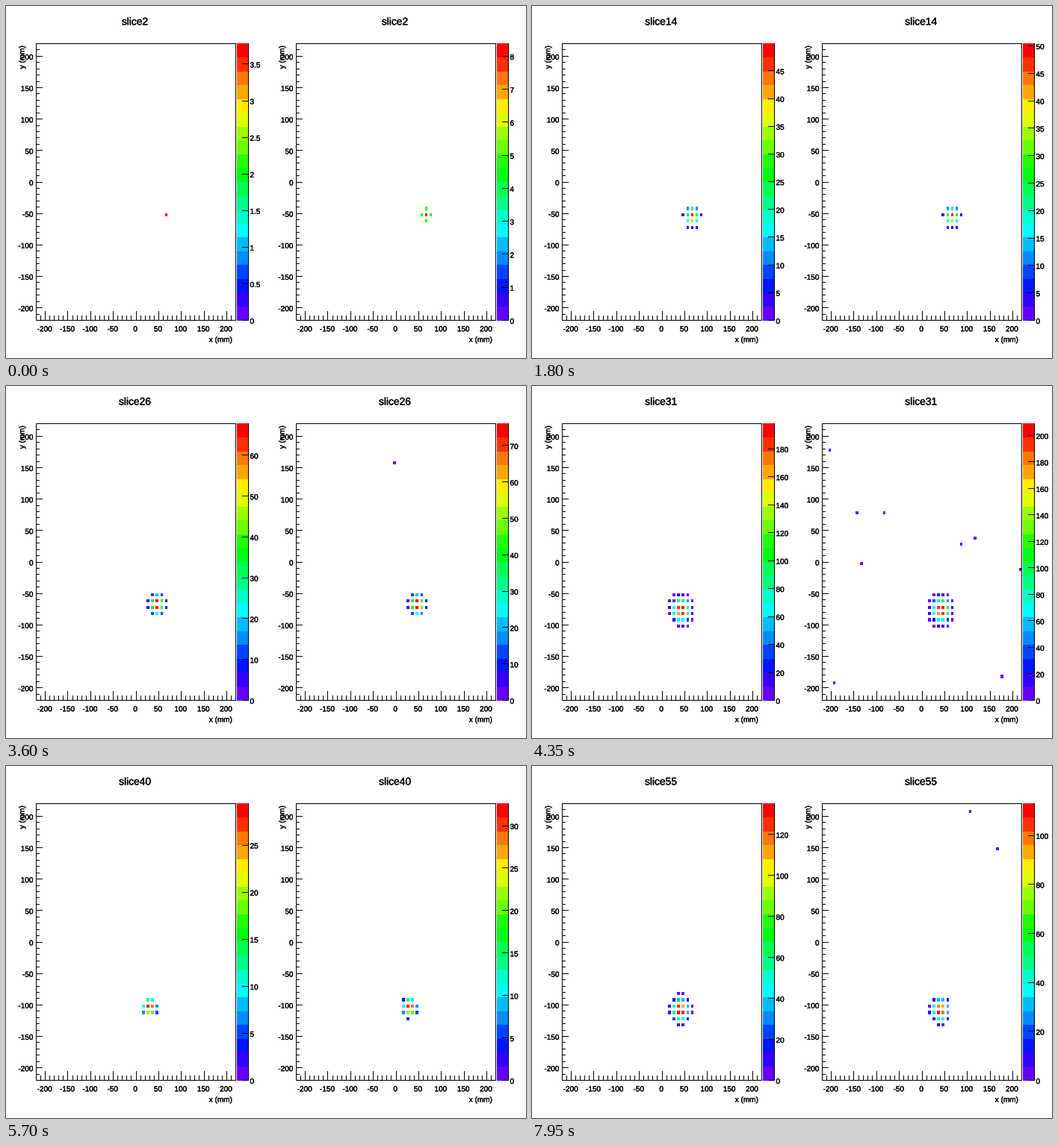
These frames come from a looping animation (696x472 px, 8000 ms). A matplotlib script:

```python
import colorsys
import math

import matplotlib.pyplot as plt
import numpy as np
from matplotlib.animation import FuncAnimation
from matplotlib.collections import LineCollection, PatchCollection
from matplotlib.patches import Rectangle
from matplotlib.patheffects import withStroke

W, H, DPI = 696, 472, 100
INTERVAL, LOOP, STEP = 50, 8000, 150
FIRST_SLICE = 2
PX = 72 / DPI
LEFT, RIGHT, TOP, BOTTOM = 40.5, 307.5, 50.5, 421.5
SCALE_X, SCALE_Y = (RIGHT - LEFT) / 440, (BOTTOM - TOP) / 440
OFFSETS = (0, 348)
LEVELS = 20
COLORS = [colorsys.hsv_to_rgb((280 - 5.6 * (int((i + 0.99) * 2.5) + 1)) / 360, 1, 1)
          for i in range(LEVELS)]
CUTOFF = 3.5

# Spot path along the slices: slice, x, y, left peak, right peak
PATH = np.array([
    (2, 67, -52, 3.78, 8.38),
    (14, 67, -54, 49.9, 50.4),
    (20, 53, -57, 18.7, 22.6),
    (31, 43, -76, 198, 209),
    (40, 31, -104, 29.4, 32.6),
    (47, 35, -110, 34.9, 24.5),
    (55, 41, -108, 135, 113),
])
XS = np.arange(-213, 220, 10)
YS = np.arange(-212, 220, 10)

fig = plt.figure(figsize=(W / DPI, H / DPI), dpi=DPI, facecolor="white")
ax = fig.add_axes((0, 0, 1, 1))
ax.set(xlim=(0, W), ylim=(H, 0))
ax.axis("off")


def label(x, y, text, size=10, **kw):
    kw = {"ha": "center", "va": "center_baseline", **kw}
    return ax.text(x, y, text, fontsize=size * PX, family="Liberation Sans",
                   path_effects=[withStroke(linewidth=0.35 * PX, foreground="black")], **kw)


def lines(segments):
    """Draw black lines one pixel wide, centred on whole pixels."""
    centred = [np.floor(segment) + 0.5 for segment in segments]
    return ax.add_collection(LineCollection(centred, colors="black", linewidths=PX,
                                            antialiaseds=False, snap=False,
                                            capstyle="projecting", zorder=3))


def boxes(rects, colors):
    patches = [Rectangle((x0, y0), x1 - x0, y1 - y0) for x0, y0, x1, y1 in rects]
    return ax.add_collection(PatchCollection(patches, facecolors=colors, edgecolors="none",
                                             linewidths=0, antialiaseds=False,
                                             snap=False, zorder=2))


def to_px(x, y):
    return LEFT + (x + 220) * SCALE_X, (TOP + BOTTOM) / 2 - y * SCALE_Y


def draw_panel(dx):
    left, right = LEFT + dx, RIGHT + dx
    segments = [[(left, TOP), (right, TOP), (right, BOTTOM), (left, BOTTOM), (left, TOP)],
                [(dx + 324, TOP), (dx + 324, BOTTOM)]]
    for value in range(-220, 221, 10):
        x, y = to_px(value, value)
        x += dx
        major = value % 50 == 0
        segments.append([(x, BOTTOM), (x, BOTTOM - (12 if major else 6))])
        segments.append([(left, y), (left + (8 if major else 4), y)])
        if major:
            label(x - 0.8, 432.3, str(value))
            label(dx + 36.6, y + 0.5, str(value), ha="right")
    lines(segments)
    label(dx + 303, 446.5, "x (mm)", ha="right")
    label(dx + 21.5, 53, "y (mm)", rotation=90, va="top")
    edges = np.round(np.linspace(BOTTOM, TOP, LEVELS + 1))
    boxes([(dx + 309, b, dx + 325, a) for a, b in zip(edges, edges[1:])], COLORS)


def tick_step(peak):
    base = 10 ** math.floor(math.log10(peak / 10))
    ratio = peak / 10 / base
    return base * next(m for limit, m in ((1, 1), (2.5, 2), (5.2, 5), (10, 10))
                       if ratio <= limit)


def along_path(number, column):
    return np.interp(number, PATH[:, 0], column)


def cells_at(panel, number):
    """Return the peak count and the colour level of every lit cell."""
    cx, cy = along_path(number, PATH[:, 1]), along_path(number, PATH[:, 2])
    peak = math.exp(along_path(number, np.log(PATH[:, 3 + panel])))
    sigma = 8.6 + peak / 100
    gx, gy = np.meshgrid(XS, YS)
    counts = peak * np.exp(-((gx - cx) ** 2 + (gy - cy) ** 2) / (2 * sigma ** 2))
    lit = counts >= min(CUTOFF, counts.max())
    if panel == 1:
        # The right panel has background hits that grow with brightness.
        rng = np.random.default_rng(number)
        strays = int((peak / 66) ** 2)
        lit[rng.integers(len(YS), size=strays), rng.integers(len(XS), size=strays)] = True
    levels = np.minimum(LEVELS - 1, LEVELS * counts / counts.max()).astype(int)
    return peak, list(zip(gx[lit], gy[lit], levels[lit]))


def cell_box(x, y, dx):
    px, py = to_px(x - 0.4, y)
    return round(px - 1.8) + dx, round(py - 2.1), round(px + 1.8) + dx, round(py + 2.1)


for offset in OFFSETS:
    draw_panel(offset)

moving = []


def update(frame):
    while moving:
        moving.pop().remove()
    number = FIRST_SLICE + frame * INTERVAL // STEP
    for panel, dx in enumerate(OFFSETS):
        peak, cells = cells_at(panel, number)
        moving.append(label(dx + 172.5, 19.8, f"slice{number}", 13.8))
        moving.append(boxes([cell_box(x, y, dx) for x, y, _ in cells],
                            [COLORS[level] for *_, level in cells]))
        step = tick_step(peak)
        ticks = []
        for k in range(int(peak / step) + 1):
            y = BOTTOM - k * step / peak * (BOTTOM - TOP)
            ticks.append([(dx + 316, y), (dx + 324, y)])
            moving.append(label(dx + 326.5, y + 0.5, f"{k * step:g}", ha="left"))
        moving.append(lines(ticks))
    return moving


anim = FuncAnimation(fig, update, frames=LOOP // INTERVAL, interval=INTERVAL,
                     init_func=lambda: update(0), repeat=True, repeat_delay=0)
plt.show()
```
